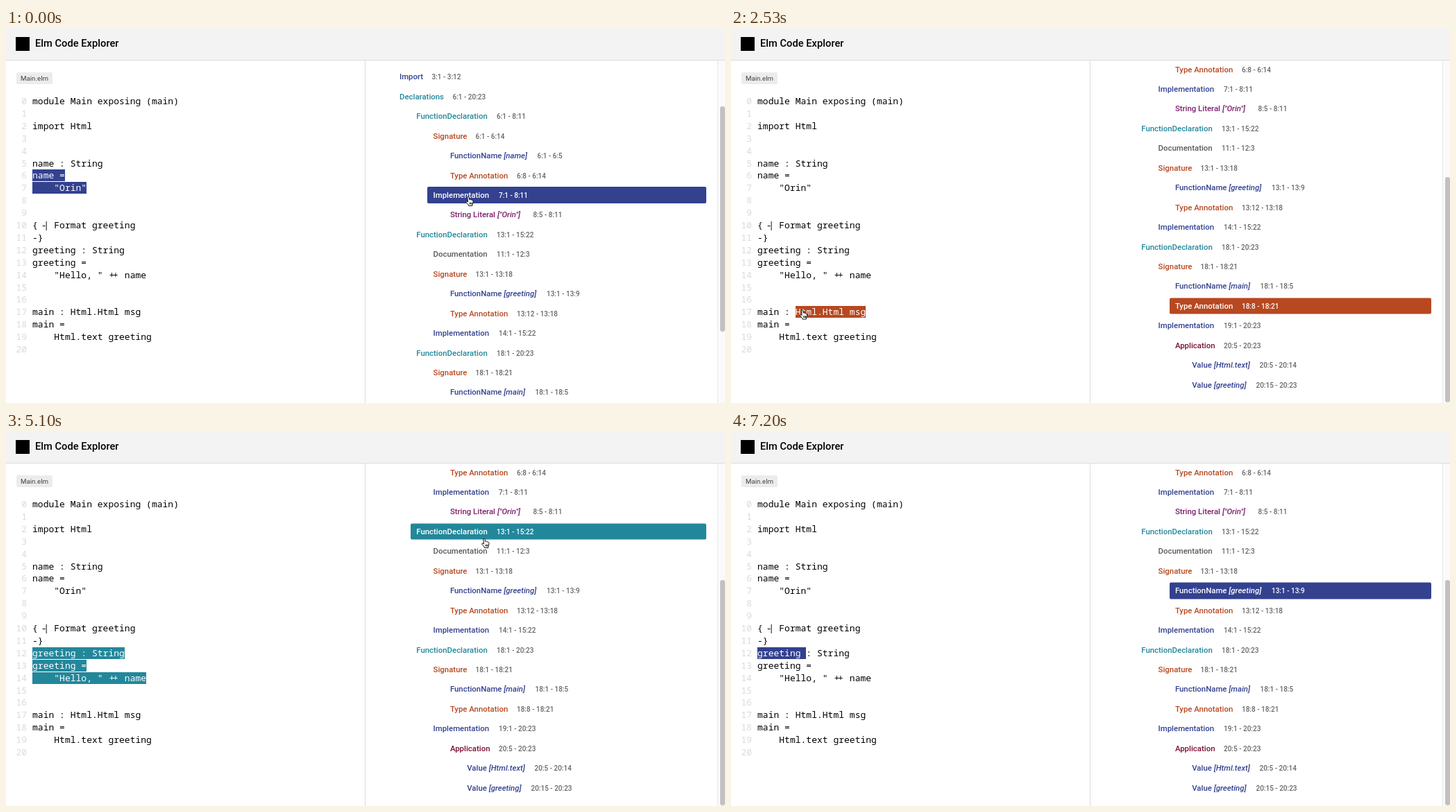
An HTML page that plays this animation: 1036x541 px, repeating every 7760 ms.

```html
<!DOCTYPE html>
<html lang="en">
<head>
<meta charset="utf-8">
<title>Elm Code Explorer</title>
<style>
html, body { margin: 0; width: 100%; height: 100%; overflow: hidden; background: #fff; }
#stage { position: relative; width: 1036px; height: 541px; overflow: hidden; background: #fff; font: 500 11.4px Roboto, sans-serif; }
#stage div, #cursor { position: absolute; }
#head { left: 0; top: 0; width: 1036px; height: 46px; background: #f3f3f3; border-bottom: 1px solid #dcdcdc; }
#logo { left: 14px; top: 13px; width: 20px; height: 20px; background: #000; }
#title { left: 42px; top: 0; font-size: 14.7px; line-height: 45px; color: #000; white-space: nowrap; }
#file { left: 15px; top: 64px; width: 52px; height: 17px; border-radius: 2px; background: #ececec; color: #444; font-size: 9.75px; font-weight: 400; line-height: 17px; text-align: center; }
#rule { left: 517px; top: 47px; width: 1px; height: 494px; background: #dcdcdc; }
#code { left: 0; top: 97.05px; font: 500 13px "Noto Sans Mono", monospace; color: #000; }
.line { left: 38px; height: 17px; display: flex; white-space: pre; line-height: 16.5px; }
.line i { position: relative; font-style: normal; }
.num { width: 22px; font-weight: 400; color: #dadada; }
#tree { left: 518px; top: 47px; width: 508px; height: 494px; overflow: hidden; }
#list { left: -518px; top: -47px; width: 1009px; height: 100%; }
.row { right: 0; height: 23.5px; line-height: 24px; border-radius: 2px; white-space: nowrap; }
.row b { position: absolute; left: 8.4px; font-weight: 500; }
.row span { position: absolute; font-size: 10px; line-height: 25px; color: #666; }
.row.on b, .row.on span { color: #fff; }
#track { left: 1025px; top: 47px; width: 10px; height: 494px; background: #fafafa; border-left: 1px solid #e8e8e8; }
#thumb { left: 1029px; top: 113px; width: 6.5px; height: 325px; border-radius: 3.25px; background: #c1c1c1; }
#cursor { left: 0; top: 0; overflow: visible; }
</style>
</head>
<body>
<div id="stage">
  <div id="code"></div>
  <div id="tree"><div id="list"></div></div>
  <div id="rule"></div>
  <div id="track"></div>
  <div id="thumb"></div>
  <div id="head"><div id="logo"></div><div id="title">Elm Code Explorer</div></div>
  <div id="file">Main.elm</div>
  <svg id="cursor" width="14" height="16" stroke-linejoin="round">
    <path id="hand" transform="translate(-4 -.5)" fill="#fff" stroke="#111" d="M3.6 8.6L2.9 2.2Q2.8.7 4 .7Q5 .7 5.2 2L5.7 5Q6.8 4.4 7.5 5.3Q8.7 4.8 9.2 5.8Q10.8 5.5 11 7Q11.3 10 10 11.8L9.9 14H4.6Q4.4 12.6 2.8 10.9L.9 8.8Q.5 7.4 1.8 7.4Q2.8 7.5 3.6 8.6ZM6.2 9.3V12M7.8 9.3V12M9.2 9.3V12"/>
    <path id="arrow" fill="#000" stroke="#fff" d="M0 0V11.5L2.7 9L4.4 13L6.1 12.2L4.4 8.5H8Z"/>
  </svg>
</div>
<script>
const LOOP = 7760, LINE = 17.9, CHAR = 7.8, PITCH = 28.44, ROW_TOP = 58.4, MAX_SCROLL = 152.6;
const $ = id => document.getElementById(id);
const add = (parent, tag, cls, text = '') => {
  const el = document.createElement(tag);
  el.className = cls;
  el.textContent = text;
  return parent.appendChild(el);
};

const source = `module Main exposing (main)

import Html


name : String
name =
    "Orin"


{-| Format greeting
-}
greeting : String
greeting =
    "Hello, " ++ name


main : Html.Html msg
main =
    Html.text greeting
`.split('\n');

// Joined glyphs: sideways shift of single characters.
const nudge = { '10:1': 5, '10:2': .5, '14:14': 1.2, '14:15': -1.2 };

const cells = source.map((text, n) => {
  const top = n * LINE + 'px';
  const num = add($('code'), 'div', 'line num', n);
  num.style.cssText = `top:${top};left:8px;justify-content:flex-end`;
  const line = add($('code'), 'div', 'line');
  line.style.top = top;
  return [...text].map((ch, c) => {
    const cell = add(line, 'span', '');
    const glyph = add(cell, 'i', '', ch);
    glyph.style.left = (nudge[n + ':' + c] || 0) + 'px';
    return cell;
  });
});

const BLUE = '#33418f', ORANGE = '#b74820', TEAL = '#23879b', GREY = '#595959', PLUM = '#7d1f6d', WINE = '#79102f';

// depth, label, detail, colour, range, x of range
const rows = [
  [0, 'Import', '', BLUE, '3:1 - 3:12', 613.5],
  [0, 'Declarations', '', TEAL, '6:1 - 20:23', 643.5],
  [1, 'FunctionDeclaration', '', TEAL, '6:1 - 8:11', 707],
  [2, 'Signature', '', ORANGE, '6:1 - 6:14', 676.5],
  [3, 'FunctionName', 'name', BLUE, '6:1 - 6:5', 765.5],
  [3, 'Type Annotation', '', ORANGE, '6:8 - 6:14', 736],
  [2, 'Implementation', '', BLUE, '7:1 - 8:11', 710],
  [3, 'String Literal', '"Orin"', PLUM, '8:5 - 8:11', 759.5],
  [1, 'FunctionDeclaration', '', TEAL, '13:1 - 15:22', 707],
  [2, 'Documentation', '', GREY, '11:1 - 12:3', 707],
  [2, 'Signature', '', ORANGE, '13:1 - 13:18', 676.5],
  [3, 'FunctionName', 'greeting', BLUE, '13:1 - 13:9', 779],
  [3, 'Type Annotation', '', ORANGE, '13:12 - 13:18', 736],
  [2, 'Implementation', '', BLUE, '14:1 - 15:22', 710],
  [1, 'FunctionDeclaration', '', TEAL, '18:1 - 20:23', 707],
  [2, 'Signature', '', ORANGE, '18:1 - 18:21', 676.5],
  [3, 'FunctionName', 'main', BLUE, '18:1 - 18:5', 762.5],
  [3, 'Type Annotation', '', ORANGE, '18:8 - 18:21', 736],
  [2, 'Implementation', '', BLUE, '19:1 - 20:23', 710],
  [3, 'Application', '', WINE, '20:5 - 20:23', 710],
  [4, 'Value', 'Html.text', BLUE, '20:5 - 20:14', 761.5],
  [4, 'Value', 'greeting', BLUE, '20:15 - 20:23', 756.5],
].map(([depth, label, detail, color, range, x], i) => {
  const left = 558.6 + depth * 24.3;
  const el = add($('list'), 'div', 'row');
  el.style.left = left + 'px';
  el.style.top = ROW_TOP + i * PITCH + 'px';
  el.style.color = color;
  const name = add(el, 'b', '', label);
  if (detail) {
    name.append(' ');
    add(name, 'em', '', `[${detail}]`);
  }
  add(el, 'span', '', range).style.left = x - left + 'px';
  return { el, left, color, range: range.match(/\d+/g).map(Number) };
});

// time, picked row
const clicks = [[0, 6], [1300, 11], [2530, 17], [4130, 8], [5270, 9], [6610, 11]];

const hold = () => 0;
const easeIn = p => p * p;
const smooth = p => p * p * (3 - 2 * p);
const cubic = p => p < .5 ? 4 * p ** 3 : 1 - 4 * (1 - p) ** 3;

// time, x, y, easing towards the next point
const path = [
  [0, 666, 243, hold],
  [30, 666, 243, smooth],
  [800, 66, 331, smooth],
  [1150, 85.5, 321, hold],
  [1630, 85.5, 321, smooth],
  [2290, 102.5, 406.5, hold],
  [2560, 102.5, 406.5, smooth],
  [3300, 640, 205, smooth],
  [3800, 689.5, 147, hold],
  [5000, 689.5, 147, smooth],
  [5240, 688, 168, hold],
  [5700, 688, 168, easeIn],
  [5870, 703.5, 222, smooth],
  [6570, 86, 320, hold],
  [6680, 86, 320, easeIn],
  [7200, 150, -20, hold],
  [LOOP, 150, -20, hold],
];

function cursorAt(t) {
  const k = path.findIndex(p => p[0] > t);
  const [t0, x0, y0, ease] = path[k - 1], [t1, x1, y1] = path[k];
  const p = ease((t - t0) / (t1 - t0));
  return [x0 + (x1 - x0) * p, y0 + (y1 - y0) * p];
}

function paint(picked, hoverRow, hoverCell) {
  rows.forEach(({ el, color }, i) => {
    el.classList.toggle('on', i === picked);
    el.style.background = i === picked ? color : i === hoverRow ? '#ededed' : '';
  });
  const { color, range: [l0, c0, l1, c1] } = rows[picked];
  cells.forEach((line, n) => line.forEach((cell, c) => {
    const row = n + 1, col = c + 1;
    const on = row >= l0 && row <= l1 && (row > l0 || col >= c0) && (row < l1 || col <= c1);
    cell.style.background = on ? color : cell === hoverCell ? '#e9e9e9' : '';
    cell.style.color = on ? '#fff' : '';
  }));
}

let last = [];
function frame(now) {
  const t = now % LOOP;
  const scroll = MAX_SCROLL * cubic(Math.min(1, Math.max(0, (t - 1302) / 298)));
  $('list').style.transform = `translateY(${-scroll}px)`;
  $('thumb').style.transform = `translateY(${scroll * .668}px)`;

  const [x, y] = cursorAt(t);
  const picked = clicks.filter(c => c[0] <= t).pop()[1];
  const hoverRow = y < 47 ? -1 : rows.findIndex(({ left }, i) =>
    x >= left && x <= 1009 && Math.abs(y - ROW_TOP - 12 - i * PITCH + scroll) <= 12);
  const line = cells[Math.floor((y - 97.05) / LINE)];
  const hoverCell = line && line[Math.floor((x - 38) / CHAR)];
  const state = [picked, hoverRow, hoverCell];
  if (state.some((v, i) => v !== last[i])) paint(...state);
  last = state;

  const pointing = hoverRow >= 0 || !!hoverCell;
  $('hand').style.display = pointing ? '' : 'none';
  $('arrow').style.display = pointing ? 'none' : '';
  $('cursor').style.transform = `translate(${x}px, ${y}px)`;
  requestAnimationFrame(frame);
}
frame(performance.now());
</script>
</body>
</html>
```
